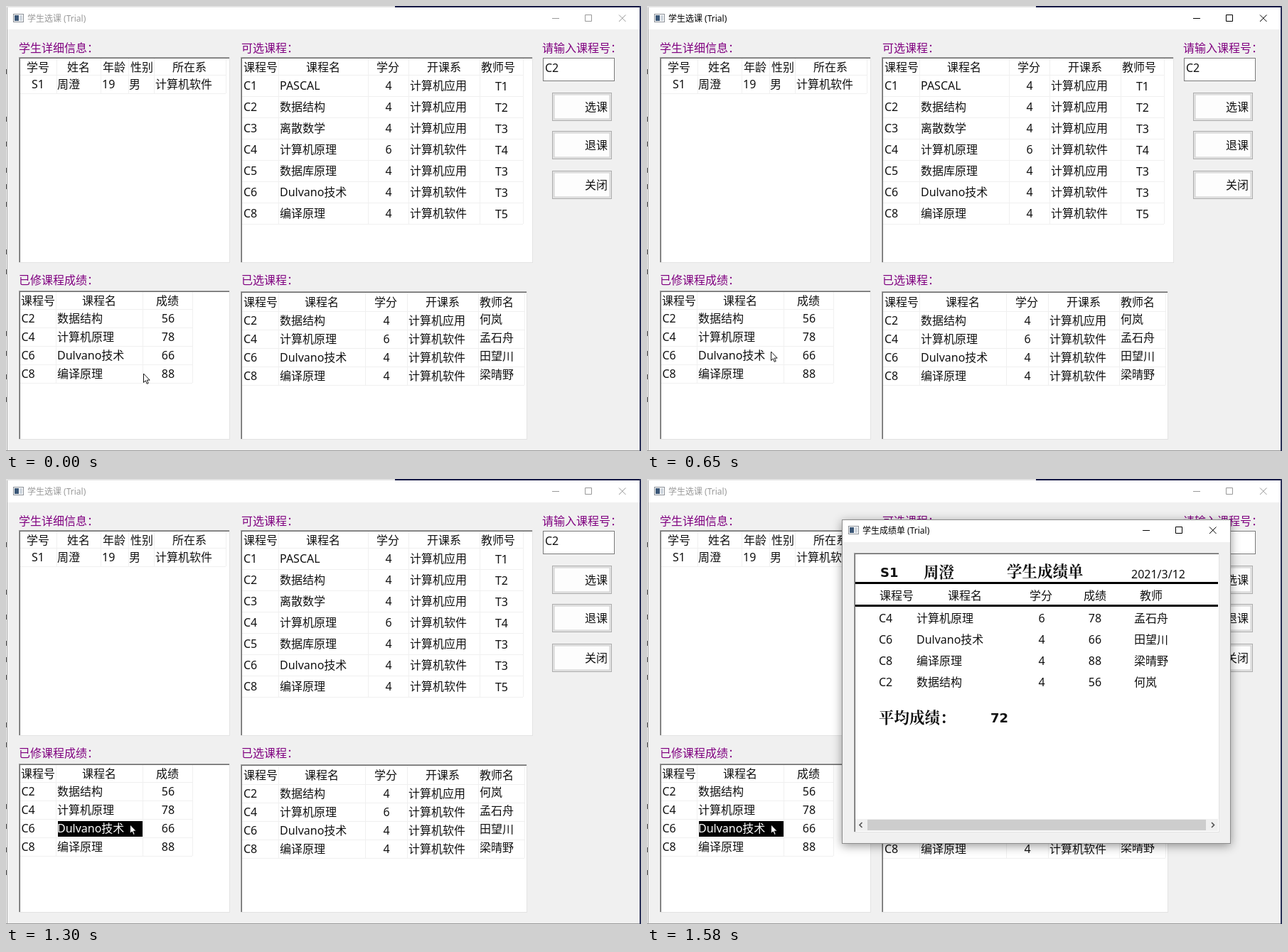
These frames come from a looping animation (893x627 px, 2040 ms). An HTML page:

```html
<!DOCTYPE html>
<html lang="zh-CN">
<head>
<meta charset="utf-8">
<style>
html, body { margin: 0; width: 100%; height: 100%; overflow: hidden; background: #f0f0f0; }
svg { display: block; }
text { font: 16px "Noto Sans", "Noto Sans CJK SC", sans-serif; white-space: pre; fill: #111; }
.mid { text-anchor: middle; }
.end { text-anchor: end; }
.label { fill: #800080; }
.title { font-size: 12px; fill: currentColor; }
.serif { font: bold 21.5px "Noto Serif CJK SC", "Noto Serif", "Noto Sans CJK SC", serif; }
.bold { font: bold 18px "DejaVu Sans", sans-serif; }
.grid { stroke: #f0f0f0; fill: none; }
.buttons { stroke: currentColor; fill: none; }
#popup { transform-origin: 547.5px 285.5px; color: #000; }
#frame { filter: drop-shadow(0 3px 7px rgba(0, 0, 0, .4)); }
</style>
</head>
<body>
<svg id="stage" width="893" height="627" viewBox="0 0 893 627"></svg>
<script>
const text = (x, y, s, cls = '', drop = 6) => `<text x="${x}" y="${y + drop}" class="${cls}">${s}</text>`;
const rect = (x, y, w, h, fill, extra = '') =>
  `<rect x="${x}" y="${y}" width="${w}" height="${h}" fill="${fill}" ${extra}/>`;
const path = (d, extra) => `<path d="${d}" ${extra}/>`;
const label = (x, y, s) => text(x, y, s, 'label');

// Sunken panel: dark top and left edges, pale bottom and right edges
function panel(x, y, w, h) {
  return rect(x, y, w, h, '#e3e3e3') + rect(x, y, w - 1, h - 1, '#a0a0a0') +
    rect(x + 1, y + 1, w - 2, h - 2, '#696969') + rect(x + 2, y + 2, w - 3, h - 3, '#fff');
}

function grid(left, top, cols, rows) {
  const right = cols[cols.length - 1], bottom = rows[rows.length - 1];
  return path(cols.map(x => `M${x + .5} ${top}V${bottom}`).join('') +
    rows.map(y => `M${left} ${y + .5}H${right}`).join(''), 'class="grid"');
}

// cols: [x, class, dy] for each cell
const table = (cols, y, step, rows) => rows.map((row, i) =>
  row.map((s, j) => text(cols[j][0], y + i * step + (cols[j][2] || 0), s, cols[j][1])).join('')).join('');
const header = (y, cells) => cells.map(([x, s]) => text(x, y, s)).join('');

function titleBar(x, y, right, title) {
  return rect(x + .5, y - 5.5, 14, 11, '#fff', 'stroke="#8a8f96"') + rect(x + 2, y - 4, 6, 8, '#3c5878') +
    rect(x + 9, y - 4, 4, 8, '#cfd6de') + text(x + 20, y, title, 'title', 4.5) +
    path(`M${right - 103} ${y + .5}h10M${right - 56.5} ${y - 4.5}h9v9h-9z` +
      `M${right - 9} ${y - 4.5}l9.5 9.5m0 -9.5l-9.5 9.5`, 'class="buttons"');
}

const button = (y, s) => rect(768.5, y + .5, 83, 39, '#e3e3e3', 'stroke="#adadad"') +
  rect(771, y + 3, 78, 34, '#fdfdfd', 'stroke="#cfcfcf"') + text(846, y + 20, s, 'end');

const app = '计算机应用', soft = '计算机软件';
const courses = {
  C1: ['PASCAL', 4, app, 'T1'], C2: ['数据结构', 4, app, 'T2', '何岚', 56],
  C3: ['离散数学', 4, app, 'T3'], C4: ['计算机原理', 6, soft, 'T4', '孟石舟', 78],
  C5: ['数据库原理', 4, app, 'T3'], C6: ['Dulvano技术', 4, soft, 'T3', '田望川', 66],
  C8: ['编译原理', 4, soft, 'T5', '梁晴野', 88]
};
const student = '周澄';
const pick = (ids, ...fields) => ids.map(id => [id, ...fields.map(f => courses[id][f])]);
const taken = ['C2', 'C4', 'C6', 'C8'];
const steps = (from, by, n) => Array.from({ length: n }, (_, i) => from + by * i);

const desktop = rect(0, 0, 893, 627, '#f0f0f0') + rect(0, 0, 891, 33, '#fff') +
  rect(0, 0, 547, 2, '#e4e4e4') + rect(547, 0, 346, 2, '#171b47') + rect(891, 0, 2, 627, '#2b3158') +
  rect(0, 2, 1, 625, '#fafafa') + rect(1, 2, 1, 625, '#a5a5a5') + rect(0, 626, 891, 1, '#9a9a9a') +
  [93, 160, 195, 232, 255, 280, 347, 375, 462, 490, 523, 555].map(y => rect(0, y - 4, 1, 7, '#555')).join('');

const studentInfo = label(18, 59, '学生详细信息：') + panel(18, 72, 297, 290) +
  grid(20, 74, [71, 133, 172, 208, 309], [97, 123]) +
  header(86, [[29, '学号'], [86, '姓名'], [136, '年龄'], [175, '性别'], [234, '所在系']]) +
  table([[36], [72], [135], [173], [210]], 110, 0, [['S1', student, 19, '男', soft]]);

const available = label(331, 59, '可选课程：') + panel(330, 72, 411, 290) +
  grid(332, 74, [383, 509, 566, 666, 727], steps(97, 30, 8)) +
  header(86, [[334, '课程号'], [422, '课程名'], [521, '学分'], [592, '开课系'], [668, '教师号']]) +
  table([[334], [385], [538, 'mid'], [568], [697, 'mid', 1]], 112, 30, pick(Object.keys(courses), 0, 1, 2, 3));

const scores = label(18, 386, '已修课程成绩：') + panel(18, 401, 297, 210) +
  grid(20, 403, [70, 192, 262], steps(427, 26, 5)) +
  header(415, [[21, '课程号'], [107, '课程名'], [211, '成绩']]) +
  table([[21.5], [72], [228, 'mid']], 440, 26, pick(taken, 0, 5)) +
  `<g id="selection">${rect(73, 482, 119, 22, '#000')}
    <text x="72" y="498" style="fill:#fff">${courses.C6[0]}</text></g>`;

const chosen = label(331, 386, '已选课程：') + panel(330, 402, 403, 209) +
  grid(332, 404, [383, 505, 564, 664, 729], steps(430, 26, 5)) +
  header(417, [[334, '课程号'], [420, '课程名'], [518, '学分'], [590, '开课系'], [666, '教师名']]) +
  table([[334], [385], [535, 'mid'], [566], [666, '', -2]], 443, 26, pick(taken, 0, 1, 2, 4));

const controls = label(754, 59, '请输入课程号：') +
  rect(755.5, 73.5, 100, 32, '#fff', 'stroke="#7a7a7a"') + text(758, 87, 'C2') +
  button(122, '选课') + button(176, '退课') + button(232, '关闭');

const report = `<g id="frame">${rect(274.5, 57.5, 546, 456, '#f0f0f0', 'stroke="#8c8c8c"')}</g>` +
  rect(275, 58, 545, 31, '#fff') + titleBar(283, 72, 800, '学生成绩单 (Trial)') +
  panel(291, 104, 514, 394) +
  text(328, 131, 'S1', 'bold', 7) + `<g style="font-size:20px">${text(389, 132, student, 'serif', 7)}</g>` +
  text(506, 130, '学生成绩单', 'serif', 8) + text(681, 134, '2021/3/12') +
  rect(293, 145, 510, 3, '#000') + rect(293, 177, 510, 3, '#000') +
  header(164, [[327, '课程号'], [423, '课程名'], [538, '学分'], [614, '成绩'], [693, '教师']]) +
  table([[326], [379], [555, 'mid'], [630, 'mid'], [685]], 196, 30, pick(['C4', 'C6', 'C8', 'C2'], 0, 1, 5, 4)) +
  text(326, 336, '平均成绩：', 'serif', 8) + text(483, 336, '72', 'bold', 7) +
  rect(293, 479, 510, 17, '#f0f0f0') + rect(310, 480, 476, 15, '#cdcdcd') +
  path('M302.5 484l-3.5 3.5l3.5 3.5M794 484l3.5 3.5l-3.5 3.5', 'fill="none" stroke="#505050" stroke-width="1.6"');

const pointers =
  path('M.5 .5V13L3.3 10.3L5.2 14.8L7.2 14L5.3 9.6H9.2Z', 'id="arrow" fill="#fff" stroke="#000" stroke-width=".9"') +
  `<g id="busy"><circle r="6" fill="none" stroke="#1583e0" stroke-width="4"/>
    <circle id="glint" r="6" fill="none" stroke="#5db8ff" stroke-width="3" stroke-dasharray="11 27"/></g>`;

document.getElementById('stage').innerHTML = desktop +
  `<g id="bar">${titleBar(10, 17, 871, '学生选课 (Trial)')}</g>` +
  studentInfo + available + scores + chosen + controls + `<g id="popup">${report}</g>` + pointers;

const el = id => document.getElementById(id);
const show = (id, on) => el(id).style.display = on ? '' : 'none';
const passed = (times, t) => times.filter(at => t >= at).length;

function draw(t) {
  const move = passed([90, 180, 280, 370], t) / 4;
  el('arrow').setAttribute('transform', `translate(${193 - 19 * move} ${517.5 - 31 * move})`);
  el('bar').style.color = t >= 650 && t < 1210 ? '#000' : '#999';
  show('selection', t >= 740);

  const busy = t >= 840 && t < 1300;
  show('busy', busy);
  show('arrow', !busy);
  el('busy').setAttribute('transform', 'translate(173.5 487.5)');
  el('glint').setAttribute('transform', `rotate(${passed([930, 1020, 1110, 1210], t) * 80 - 120})`);

  const stage = passed([1400, 1480, 1580], t);
  show('popup', stage);
  el('popup').style.opacity = [0, .55, .87, 1][stage];
  el('popup').style.transform = `scale(${[1, .976, .993, 1][stage]})`;
}

function tick() {
  draw(performance.now() % 2040);
  requestAnimationFrame(tick);
}
tick();
</script>
</body>
</html>
```
